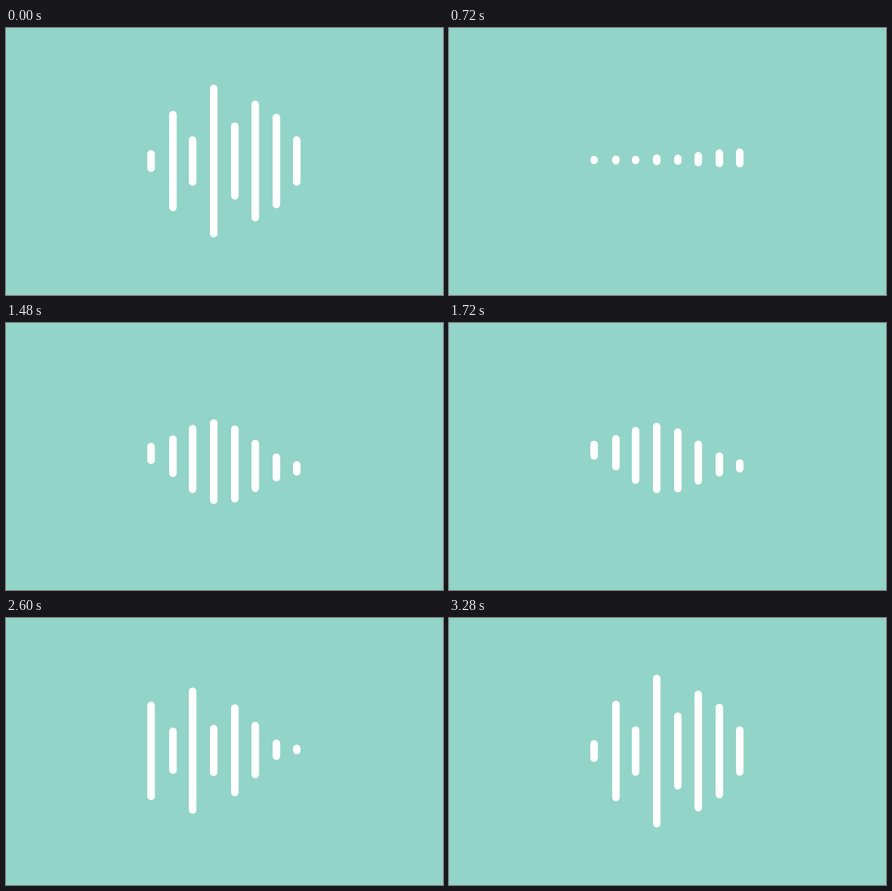
Animation of 600 by 367 pixels, one loop 3360 ms. Source, as an HTML page with a canvas:

```html
<!DOCTYPE html>
<html lang="en">
<head>
<meta charset="utf-8">
<title>Sound bars</title>
<style>
  html, body { margin: 0; width: 100%; height: 100%; overflow: hidden; background: #93d4c8; }
  canvas { display: block; width: 600px; height: 367px; }
</style>
</head>
<body>
<canvas id="stage"></canvas>
<script>
const W = 600, H = 367, LOOP = 3360, STEP = 40;
const BAR_W = 10.4, DOT = 5.6, MID = 182.7;
const barX = [199.2, 229.2, 256.2, 285.2, 314.2, 342.2, 371.2, 399.2];

// Half lengths of the resting wave and of the crest that leads into it.
const wave = [15, 69, 34, 105, 53, 83, 65, 34];
const crest = [71, 35, 105, 47, 102, 78, 34, 15];

const mix = (a, b, p) => a + (b - a) * p;
const ramp = (t, start, length) => Math.min(1, Math.max(0, (t - start) / length));
const smooth = p => p * p * (3 - 2 * p);
const easeOut = p => 1 - (1 - p) ** 2;
const fall = x => x <= 0 ? 1 : 1 / (1 + x ** 3);

// Monotone cubic through [time, value] keys, resting at both ends.
function spline(keys, t) {
  const last = keys.length - 1;
  if (t <= keys[0][0]) return keys[0][1];
  if (t >= keys[last][0]) return keys[last][1];
  const slope = k => (keys[k + 1][1] - keys[k][1]) / (keys[k + 1][0] - keys[k][0]);
  const tangent = k => {
    if (k === 0 || k === last) return 0;
    const a = slope(k - 1), b = slope(k);
    return a * b > 0 ? 2 * a * b / (a + b) : 0;
  };
  let k = 0;
  while (t > keys[k + 1][0]) k++;
  const [t0, v0] = keys[k], [t1, v1] = keys[k + 1];
  const d = t1 - t0, u = (t - t0) / d;
  return mix(v0, v1, smooth(u)) +
    d * u * (1 - u) * ((1 - u) * tangent(k) - u * tangent(k + 1));
}

const restMid = [[1080, 181.4], [2040, 180.3]];
const swell = [[1080, 0], [1240, 35], [1480, 53], [1720, 43], [2040, 1.2], [2200, 0]];
const sway = [[1080, 0], [1240, 20], [1720, 18], [2040, 0]];

// The wave collapses from left to right; bottom edges lead the top ones.
function collapse(i, t) {
  const rest = spline(restMid, t);
  const n = (t - 320) / STEP - i;
  const edge = (sign, lag) =>
    mix(rest + sign * DOT, MID + sign * wave[i], fall((n - lag) / 1.7));
  return [edge(-1, 1), edge(1, 0)];
}

// A soft hill swells out of the dots while a tilt passes through it.
function hill(i, t) {
  const shape = Math.exp(-(((i - 3.2) / 1.7) ** 2) / 2);
  const half = DOT + spline(swell, t) * shape;
  const phase = 0.2 * i + 0.15 - (t - 1240) / 1000;
  const mid = spline(restMid, t) + spline(sway, t) * Math.sin(phase);
  return [mid - half, mid + half];
}

// Bars shoot up one after another and settle into the wave.
function rise(i, t) {
  const up = easeOut(ramp(t, 2297 + STEP * i, 390));
  const settle = smooth(ramp(t, 2720 + 20 * i, 380));
  const half = mix(DOT, mix(crest[i], wave[i], settle), up);
  const mid = mix(spline(restMid, t), MID, up);
  return [mid - half, mid + half];
}

const canvas = document.getElementById("stage");
const ctx = canvas.getContext("2d");
const ratio = window.devicePixelRatio || 1;
canvas.width = Math.round(W * ratio);
canvas.height = Math.round(H * ratio);
ctx.scale(ratio, ratio);

function draw(t) {
  const pose = t < 1080 ? collapse : t < 2240 ? hill : rise;
  const r = BAR_W / 2;
  ctx.fillStyle = "#93d4c8";
  ctx.fillRect(0, 0, W, H);
  ctx.strokeStyle = "#fff";
  ctx.lineWidth = BAR_W;
  ctx.lineCap = "round";
  barX.forEach((x, i) => {
    const [top, bottom] = pose(i, t);
    ctx.beginPath();
    ctx.moveTo(x, top + r);
    ctx.lineTo(x, bottom - r);
    ctx.stroke();
  });
}

const begin = performance.now();
function tick() {
  const t = (performance.now() - begin) % LOOP;
  draw(Math.floor(t / STEP) * STEP);
  requestAnimationFrame(tick);
}
tick();
</script>
</body>
</html>
```
